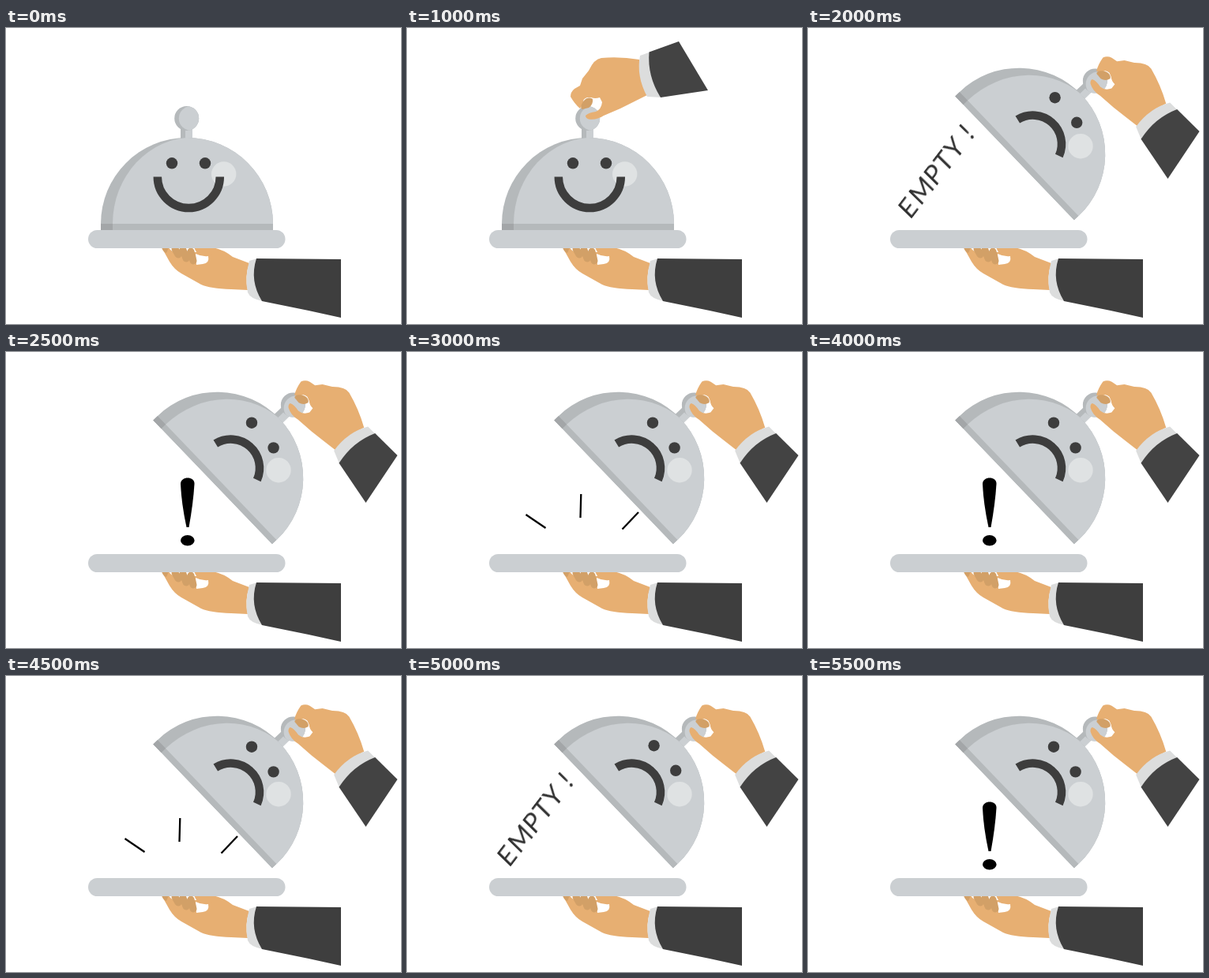
An HTML page that plays this animation: 500x375 px, repeating every 6000 ms.

```html
<!DOCTYPE html>
<html lang="en">
<head>
<meta charset="utf-8">
<title>Empty dish</title>
<style>
  html, body { margin: 0; width: 100%; height: 100%; overflow: hidden; background: #fff; }
  svg { display: block; width: 500px; height: 375px; }
  .metal { fill: #cbcfd2; }
  .shade { fill: #b5b9bb; }
  .skin { fill: #e7af72; }
  .fold { fill: #d2a067; }
  .fingers { fill: none; stroke: #d2a067; stroke-width: 9; stroke-linecap: round; }
  .cuff { fill: #dcdddd; }
  .suit { fill: #3e3e3e; }
  .face { fill: #3d3d3d; }
  .mouth { fill: none; stroke: #3d3d3d; stroke-width: 10.5; }
  .word { font: 33px Lato, "Open Sans", sans-serif; fill: #303030; }
  .rays { stroke: #000; stroke-width: 2.3; }
  [data-on] { opacity: 0; }
</style>
</head>
<body>
<svg viewBox="0 0 500 375">
  <defs>
    <clipPath id="domeClip"><path d="M120 256V248A109 109 0 0 1 338 248V256Z"/></clipPath>
    <clipPath id="knobClip"><circle cx="228.7" cy="114.5" r="15.5"/></clipPath>

    <g id="lid">
      <path class="metal" d="M221 126H236V141H221Z"/>
      <path class="shade" d="M221 126H227V141H221Z"/>
      <g clip-path="url(#knobClip)">
        <path class="shade" d="M212 98H246V131H212Z"/>
        <circle class="metal" cx="234.5" cy="114.5" r="15.7"/>
      </g>
      <g clip-path="url(#domeClip)">
        <path class="shade" d="M119 138H339V257H119Z"/>
        <path class="metal" d="M135 248A102 109.5 0 0 1 237 138.5H339V248Z"/>
        <path fill="#a3a6a8" d="M119 248H135V257H119Z"/>
      </g>
      <circle cx="275.7" cy="185" r="15.7" fill="#dfe2e3"/>
    </g>

    <g id="topHand">
      <path class="skin" d="M207 87Q207 81 212 77L219 73L222 64L230 54Q237 39 246 38Q270 36 294 40Q293 62 304 85L288 93L270 102L249 111Q240 117 230 115.500Q226 114 226 111Q230 107 239 106Q246 103 247 94L244 88Q238 90 233 88L228 88Q222 90 223 95L219 102Q212 96 207 87Z"/>
      <path class="fold" d="M223 93Q229 86 235 90Q236 97 230 101L222 103Q218 101 223 93Z"/>
      <path class="cuff" d="M295 35L309 30L323 88L304 87Q290 61 295 35Z"/>
      <path fill="#434343" d="M306.500 30.500L344 17L381 79L321 88Q304 61 306.500 30.500Z"/>
    </g>
  </defs>

  <g id="bottomHand">
    <path class="skin" d="M197 278L207 296Q213 306 222 311L247 325Q258 330 285 331L306 332Q302 315 308 298L287 290Q276 281 262 278Z"/>
    <path class="fold" d="M197 278H206L203 285Q199 284 197 278Z"/>
    <path fill="#fff" d="M206 278H240L241 284H213Q208 282 206 278ZM240 286Q248 290 256 289Q258 298 249 299L241 300Z"/>
    <path class="fingers" d="M214 280L218 287M224 281L228 292M234 283L237 295"/>
    <path class="skin" d="M238 278H262V287L248 288Q242 288 238 278Z"/>
    <path class="cuff" d="M308 295L318 292L325 346Q309 343 306 335Q302 317 308 295Z"/>
    <path class="suit" d="M317 292L424 293V367L383 358L324 346Q308 320 317 292Z"/>
  </g>
  <rect class="metal" x="104" y="256" width="249.500" height="23" rx="11.5"/>

  <g data-on="111100000000">
    <use href="#lid"/>
    <circle class="face" cx="210" cy="171.3" r="7.2"/>
    <circle class="face" cx="252" cy="171.3" r="7.2"/>
    <path class="mouth" d="M191.800 188.500A39.500 39.500 0 0 0 270.800 188.500"/>
  </g>
  <use href="#topHand" data-on="001100000000"/>

  <g data-on="000011111111">
    <use href="#lid" transform="translate(186 86.500) rotate(46.2) translate(-120 -256)"/>
    <path class="mouth" d="M265.300 116A36.500 36.500 0 0 1 317.800 162"/>
    <use href="#topHand" transform="translate(495.500 131) rotate(64.5) translate(-344 -17)"/>
  </g>
  <g class="face" data-on="000010010010">
    <circle cx="312.6" cy="88.2" r="7.2"/>
    <circle cx="340.2" cy="119.8" r="7.2"/>
  </g>
  <g class="face" data-on="000001101101">
    <circle cx="311" cy="89.7" r="7.2"/>
    <circle cx="338.6" cy="121.4" r="7.2"/>
  </g>

  <text class="word" data-on="000010010010" x="-5 17 48 69 90 111 122"
    transform="translate(132.500 240) rotate(-52.5) skewX(-7)">EMPTY !</text>
  <g data-on="000001001001">
    <path d="M221 167C221 157 239 157 238.500 167Q237 192 231.500 222H228.500Q222 192 221 167Z"/>
    <ellipse cx="229.8" cy="238.8" rx="8.8" ry="6.8"/>
  </g>
  <path class="rays" data-on="000000100100" d="M150.500 206L175.500 223M220.300 180L219.500 210M293 203L272.500 224.500"/>
</svg>
<script>
  // Each digit of data-on is one half-second beat: 1 shown, 0 hidden.
  const BEAT = 500;
  for (const part of document.querySelectorAll('[data-on]')) {
    const beats = [...part.dataset.on];
    const steps = [...beats, beats.at(-1)].map((on, i) => ({
      opacity: Number(on),
      offset: i / beats.length,
      easing: 'steps(1, end)'
    }));
    part.animate(steps, { duration: beats.length * BEAT, iterations: Infinity });
  }
</script>
</body>
</html>
```
